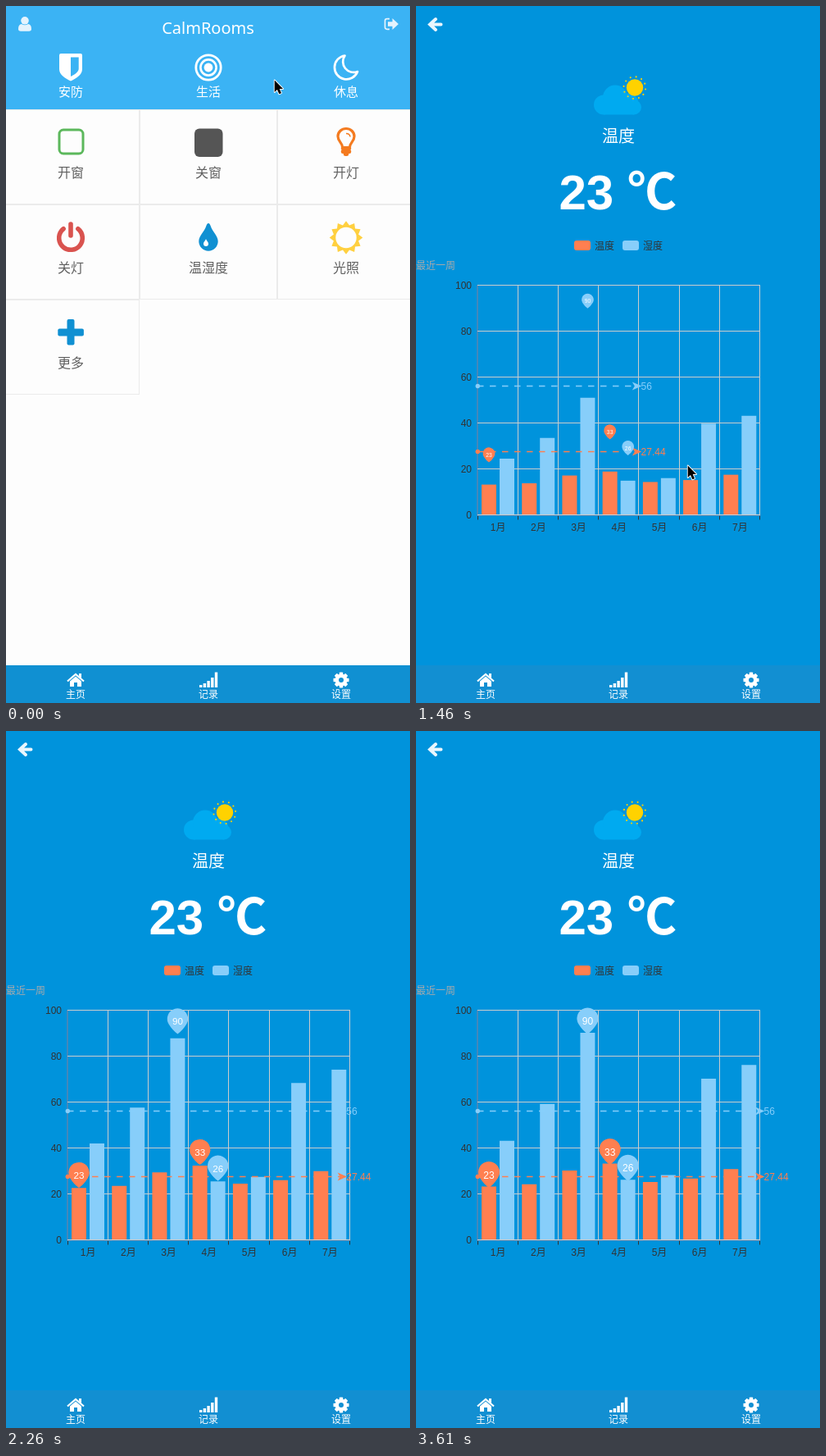
An HTML page with a canvas that plays this animation: 493x850 px, repeating every 3710 ms.

```html
<!DOCTYPE html>
<html lang="zh">
<head>
<meta charset="utf-8">
<title>CalmRooms</title>
<style>
  html, body { margin: 0; width: 100%; height: 100%; overflow: hidden; background: #0093dc; }
  canvas { display: block; }
</style>
</head>
<body>
<canvas id="stage" width="493" height="850"></canvas>
<script>
const ctx = document.getElementById('stage').getContext('2d');
const LOOP = 3710, CHART_AT = 1250, GROW_START = 1220, GROW_TIME = 2000;
const STEPS = [0, 50, 140, 500, 1250, 1310, 1460, 1550, 1640, 1730, 1820, 1910, 2000, 2090, 2180, 2260,
  2350, 2440, 2520, 2610, 2700, 2790, 2880, 2970, 3060, 3150, 3240, 3330, 3470, 3540, 3610];
const SANS = '"Liberation Sans", "Noto Sans CJK SC", "Noto Sans CJK", sans-serif';
const CJK = '"Noto Sans CJK SC", "Noto Sans CJK", sans-serif';
const HUMAN = '"DejaVu Sans", "Noto Sans CJK SC", "Noto Sans CJK", sans-serif';
const BLUE = '#1090d2', WARM = '#ff7f50', COOL = '#87cefa', AXIS = '#4488bb';
const TAU = Math.PI * 2;

// ---- drawing helpers ----
function text(str, x, midY, size, color, align = 'center', font = SANS, weight = '') {
  ctx.font = `${weight} ${size}px ${font}`;
  ctx.textAlign = align;
  ctx.fillStyle = color;
  ctx.fillText(str, x, midY + size * 0.37);
}
function rect(x, y, w, h, color, r = 0) {
  ctx.fillStyle = color;
  ctx.beginPath();
  ctx.roundRect(x, y, w, h, r);
  ctx.fill();
}
function disc(x, y, r, color) {
  ctx.fillStyle = color;
  ctx.beginPath();
  ctx.arc(x, y, r, 0, TAU);
  ctx.fill();
}
function ring(x, y, r, width, color, from = 0, to = TAU) {
  ctx.strokeStyle = color;
  ctx.lineWidth = width;
  ctx.beginPath();
  ctx.arc(x, y, r, from, to);
  ctx.stroke();
}
function fill(d, color, rule = 'nonzero') {
  ctx.fillStyle = color;
  ctx.fill(new Path2D(d), rule);
}
function stroke(d, color, width) {
  ctx.strokeStyle = color;
  ctx.lineWidth = width;
  ctx.stroke(new Path2D(d));
}
function at(x, y, draw) {
  ctx.save();
  ctx.translate(x, y);
  draw();
  ctx.restore();
}

// ---- icons, drawn around their own centre ----
const icons = {
  shield() {
    fill('M-14 -15Q-14 -17 -12 -17H12Q14 -17 14 -15V2C14 9 7 13 0 16.5C-7 13 -14 9 -14 2Z' +
      'M0 -12.5V11C5 8.5 9.7 5.5 9.7 1.5V-12.5Z', '#fff', 'evenodd');
  },
  target() {
    ring(0, 0, 15.2, 2.8, '#fff');
    ring(0, 0, 9.6, 2.6, '#fff');
    disc(0, 0, 5.4, '#fff');
  },
  moon() {
    ctx.lineJoin = 'round';
    stroke('M-1.5 -14.5A14.5 14.5 0 1 0 14 5A13 13 0 0 1 -1.5 -14.5Z', '#fff', 2.7);
  },
  openWindow() {
    ctx.strokeStyle = '#5cb85c';
    ctx.lineWidth = 3;
    ctx.beginPath();
    ctx.roundRect(-14, -15, 29, 29, 5);
    ctx.stroke();
  },
  closedWindow() { rect(-17, -16.5, 34.5, 34.5, '#555', 6); },
  bulb() {
    stroke('M-4.5 6C-4.5 1 -10 -1 -10 -7A10 9.5 0 0 1 10 -7C10 -1 4.5 1 4.5 6', '#f47b20', 3.2);
    stroke('M0 -10.5Q4.5 -10.5 5 -6.5', '#f47b20', 1.6);
    rect(-6.2, 5, 12.4, 4.8, '#f47b20', 2);
    rect(-6.2, 9, 12.4, 5, '#f47b20', 2);
    rect(-3.2, 12, 6.4, 5, '#f47b20', 2.5);
  },
  power() {
    ctx.lineCap = 'round';
    ring(0, 1, 14.3, 5.6, '#d9534f', -0.9, Math.PI + 0.9);
    stroke('M0 -16V-2', '#d9534f', 5.6);
  },
  drop() {
    fill('M0 -17C1.5 -17 2 -15.5 2.6 -14C5 -6.5 11.7 -2 11.7 5A11.7 11.7 0 0 1 -11.7 5' +
      'C-11.7 -2 -5 -6.5 -2.6 -14C-2 -15.5 -1.5 -17 0 -17Z', BLUE);
    fill('M-3 2C-2 5 0 5.5 0 8A3 3 0 0 1 -6 8C-6 5.5 -4 5 -3 2Z', '#fff');
  },
  sun() {
    ctx.fillStyle = '#ffd040';
    ctx.beginPath();
    for (let i = 0; i < 24; i++) {
      const a = i * TAU / 24, r = i % 2 ? 15.6 : 20.3;
      ctx.lineTo(r * Math.sin(a), -r * Math.cos(a));
    }
    ctx.fill();
    disc(0, 0, 12.7, '#fdfdfd');
  },
  plus() {
    rect(-15.7, -4.6, 31.6, 9, BLUE, 2);
    rect(-4.5, -16, 9, 31.6, BLUE, 2);
  },
  user() {
    disc(0, -4.2, 4.8, '#e4f3fd');
    fill('M-4 0Q0 2.5 4 0Q8 .5 8 6Q8 8.7 5 8.7H-5Q-8 8.7 -8 6Q-8 .5 -4 0Z', '#e4f3fd');
  },
  exit() {
    stroke('M-2 -6.3H-5Q-7.5 -6.3 -7.5 -4V4Q-7.5 6.3 -5 6.3H-2', '#e4f3fd', 1.7);
    fill('M-4 -2.7H1.5V-7L9 0L1.5 7V2.7H-4Z', '#e4f3fd');
  },
  back() {
    ctx.lineCap = 'round';
    stroke('M.5 -6.5L-6.5 0L.5 6.5M-5 0H7', '#eaf6fd', 4);
  },
  home() {
    stroke('M-10 1.5L0 -7L10 1.5', '#fff', 2.2);
    fill('M-7 1.5L0 -4.5L7 1.5V8H2V3H-2V8H-7ZM4 -8H7V-2L4 -4.5Z', '#fff');
  },
  signal() {
    [3, 5, 8, 12, 18.5].forEach((h, i) => rect(-11 + i * 4.7, 9 - h, 3.4, h, '#fff'));
  },
  gear() {
    for (let i = 0; i < 8; i++) {
      ctx.rotate(TAU / 8);
      rect(-2.2, -9.5, 4.4, 5, '#fff', 0.8);
    }
    ring(0, 0, 5.2, 4.4, '#fff');
  },
  cursor() {
    const d = 'M.7 .5V15L4 12L6.3 17.3L9 16.2L6.7 11H11Z';
    ctx.lineJoin = 'round';
    stroke(d, '#fff', 1.8);
    fill(d, '#000');
  }
};
const icon = (name, x, y) => at(x, y, icons[name]);

// ---- pages ----
function footer(color) {
  rect(0, 804, 493, 46, color);
  [['home', '主页'], ['signal', '记录'], ['gear', '设置']].forEach(([name, label], i) => {
    const x = 85 + i * 162;
    icon(name, x, 822);
    text(label, x, 840, 12, '#fff');
  });
}

function homePage() {
  rect(0, 0, 493, 850, '#fdfdfd');
  rect(0, 0, 493, 126, '#3bb3f4');
  text('CalmRooms', 246.5, 27, 20, '#fff', 'center', '"Noto Sans", sans-serif');
  icon('user', 23, 22);
  icon('exit', 470, 22);
  [['shield', '安防'], ['target', '生活'], ['moon', '休息']].forEach(([name, label], i) => {
    icon(name, 79 + i * 168, 75);
    text(label, 79 + i * 168, 104, 15, '#fff');
  });
  [['openWindow', '开窗'], ['closedWindow', '关窗'], ['bulb', '开灯'], ['power', '关灯'],
    ['drop', '温湿度'], ['sun', '光照'], ['plus', '更多']].forEach(([name, label], i) => {
    const left = i % 3 * 168 - 5, top = 126 + Math.floor(i / 3) * 116;
    ctx.strokeStyle = '#ebebeb';
    ctx.lineWidth = 1;
    ctx.strokeRect(left + 0.5, top + 0.5, 167, 115);
    icon(name, left + 84, top + (i === 5 ? 40.5 : 40));
    text(label, left + 84, top + 77.5, 16, '#606060');
  });
  footer(BLUE);
}

function weather(time) {
  const cloud = '#00aaf0';
  disc(229, 120.5, 12, cloud);
  disc(243, 111.5, 15, cloud);
  disc(259, 119, 12.5, cloud);
  disc(266, 123.5, 9, cloud);
  rect(229, 115, 37, 17.5, cloud);
  disc(267, 99.5, 10.2, '#ffd200');
  for (let i = 0; i < 12; i++) {
    const a = i * TAU / 12 + (4 + (time - CHART_AT) * 0.018) * TAU / 360;
    disc(266.8 + 13.4 * Math.sin(a), 99.7 - 13.4 * Math.cos(a), 1.05, '#ffd200');
  }
}

const LEFT = 75, RIGHT = 419.5, BASE = 620, BAND = (RIGHT - LEFT) / 7;
const valueY = v => BASE - v * 2.8;
const series = [
  { color: WARM, x: 80, values: [23, 24, 30, 33, 25, 26.5, 30.6], mean: 27.44, pins: [0, 3] },
  { color: COOL, x: 102, values: [43, 59, 90, 26, 28, 70, 76], mean: 56, pins: [2, 3] }
];

function grid() {
  stroke(`M${LEFT} 340V622M${LEFT - 1} 621H${RIGHT + 1}`, AXIS, 2);
  for (let i = 0; i <= 7; i++) {
    const x = Math.floor(LEFT + i * BAND) + 0.5;
    if (i) stroke(`M${x} 340V620`, '#ccc', 1);
    stroke(`M${x} 622V626.5`, '#333', 1);
    if (i < 7) text(`${i + 1}月`, LEFT + (i + 0.5) * BAND + 0.5, 635.5, 12, '#333');
  }
  for (let v = 0; v <= 100; v += 20) {
    stroke(`M${LEFT} ${valueY(v) + 0.5}H420`, '#ccc', 1);
    text(v, 68, valueY(v) + 0.5, 12, '#333', 'right');
  }
}

function meanLine({ color, mean }, grow) {
  const y = valueY(mean) + 0.3, end = LEFT + 345 * grow;
  ctx.setLineDash([7.5, 7.5]);
  stroke(`M${LEFT} ${y}H${end}`, color, 1.5);
  ctx.setLineDash([]);
  disc(LEFT + 0.3, y, 2.7, color);
  at(end, y, () => fill('M5.5 0L-6 5L-3 0L-6 -5Z', color));
  text(mean, end + 4.7, y + 0.3, 12, color, 'left');
}

function pin(x, value, color, scale) {
  at(x, valueY(value), () => {
    ctx.scale(scale, scale);
    ctx.fillStyle = color;
    ctx.beginPath();
    ctx.arc(0, -17.5, 13, Math.PI * 5 / 6, Math.PI / 6);
    ctx.quadraticCurveTo(6.5, -3, 0, 1.5);
    ctx.quadraticCurveTo(-6.5, -3, -11.26, -11);
    ctx.fill();
    text(value, 0, -14.3, 12, '#fff');
  });
}

function tooltip() {
  rect(267, 496, 92.5, 85, 'rgba(0,0,0,.7)', 4);
  ['6月', '温度 : 26.5', '湿度 : 70'].forEach((line, i) =>
    text(line, 272, 513.5 + i * 25.2, 16, '#fff', 'left', HUMAN));
}

function chartPage(time) {
  const grow = Math.min(1, 1 - 2 ** (-10 * (time - GROW_START) / GROW_TIME));
  const hovering = time >= 1550 && time < 1820;
  rect(0, 0, 493, 850, '#0093dc');
  icon('back', 23.5, 22.5);
  weather(time);
  text('温度', 247, 158.5, 20, '#fff');
  text('23', 174.5, 225.8, 60, '#fff', 'left', SANS, 'bold');
  text('℃', 258, 225.8, 60, '#fff', 'left', CJK, 'bold');
  rect(193, 286, 20, 12, WARM, 3);
  text('温度', 218, 292.3, 12, '#333', 'left');
  rect(252, 286, 20, 12, COOL, 3);
  text('湿度', 277, 292.3, 12, '#333', 'left');
  text('最近一周', 0, 317, 12, '#aaa', 'left');
  grid();
  for (const { color, x, values } of series) {
    values.forEach((v, i) => rect(x + i * BAND, valueY(v * grow), 18, BASE - valueY(v * grow), color));
  }
  if (hovering) stroke('M346 340V620', AXIS, 1.6);
  series.forEach(s => meanLine(s, grow));
  for (const { color, x, values, pins } of series) {
    pins.forEach(i => pin(x + 9 + i * BAND, values[i], color, grow));
  }
  if (hovering) tooltip();
  footer('#128fd2');
}

// ---- pointer: [time, x, y], visible from the first key to the end time ----
const trips = [
  { end: 500, keys: [[0, 327, 90], [50, 240, 38], [140, 161.5, -17]] },
  { end: 2180, keys: [[1460, 331, 560], [1730, 337, 641], [1910, 341, 668], [2000, 343, 735], [2090, 346, 838]] }
];
function pointer(time) {
  const trip = trips.find(({ end, keys }) => time >= keys[0][0] && time < end);
  if (!trip) return;
  const next = trip.keys.findIndex(k => k[0] > time);
  let [, x, y] = trip.keys.at(-1);
  if (next > 0) {
    const [t0, x0, y0] = trip.keys[next - 1], [t1, x1, y1] = trip.keys[next];
    const p = (time - t0) / (t1 - t0);
    x = x0 + (x1 - x0) * p;
    y = y0 + (y1 - y0) * p;
  }
  icon('cursor', x, y);
}

function frame() {
  const now = performance.now() % LOOP;
  const time = STEPS.findLast(s => s <= now);
  if (time < CHART_AT) homePage(); else chartPage(time);
  pointer(time);
  requestAnimationFrame(frame);
}
frame();
</script>
</body>
</html>
```
